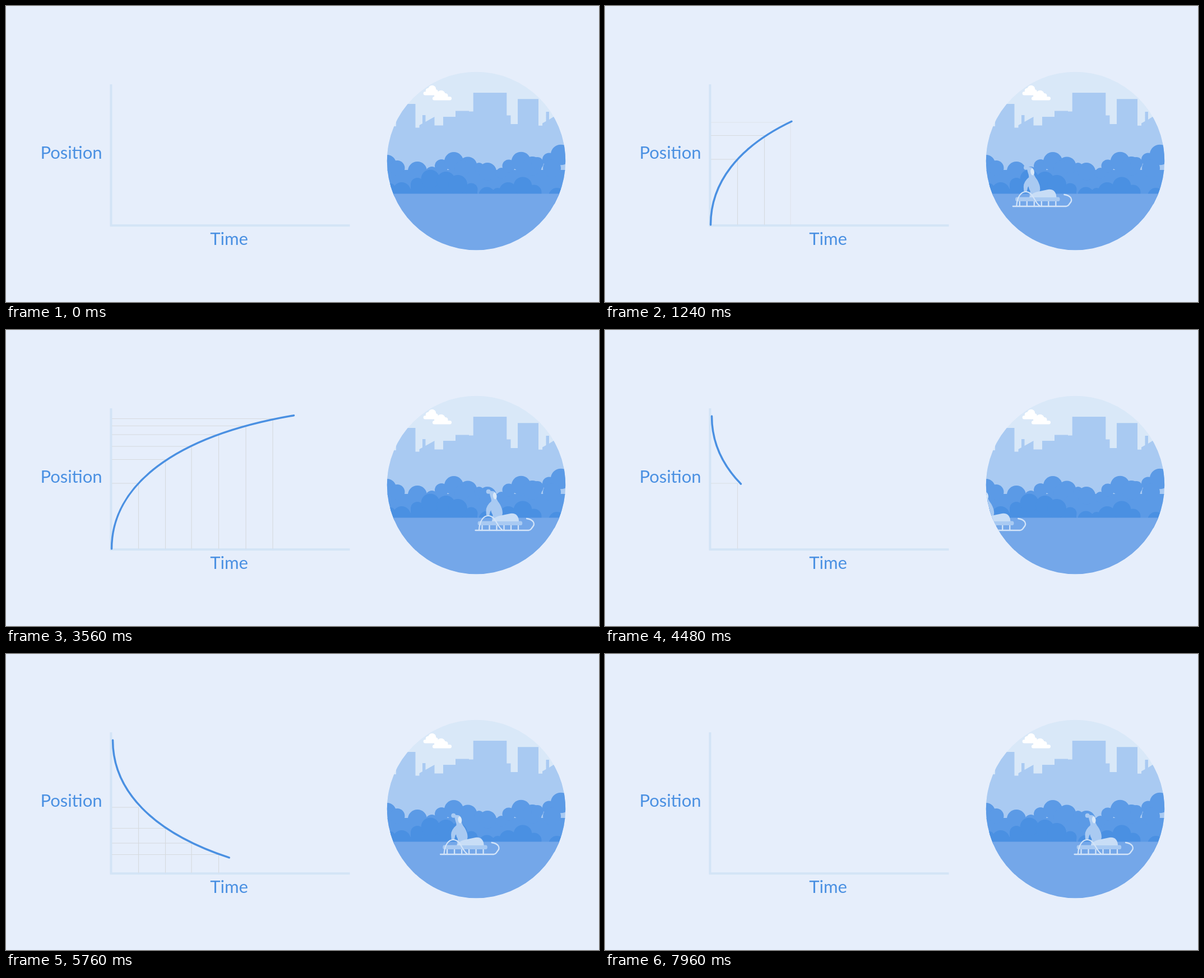
Write an HTML page that moves like this. It is 1058 px wide and 529 px high and loops after 8 s.

```html
<!DOCTYPE html>
<html lang="en">
<head>
<meta charset="utf-8">
<title>Position over time</title>
<style>
  html, body { margin: 0; width: 100%; height: 100%; overflow: hidden; background: #e6eefb; }
  svg { display: block; width: 100%; height: 100%; }
  text { font: 31px Lato, "Open Sans", sans-serif; fill: #4a90e2; text-anchor: middle; }
  .line { fill: none; stroke-linecap: round; stroke-linejoin: round; }
</style>
</head>
<body>
<svg viewBox="0 0 1058 529">
  <defs>
    <clipPath id="porthole"><circle cx="839" cy="277" r="159.2"/></clipPath>
  </defs>

  <text x="116.5" y="273">Position</text>
  <text x="398" y="427">Time</text>
  <path d="M187.4 140V392.3H613.5" fill="none" stroke="#d3e4f6" stroke-width="4"/>

  <g id="plot">
    <g id="grid" class="line" stroke="#d6dade" stroke-width="1.1"></g>
    <path id="curve" class="line" stroke="#4a90e2" stroke-width="3.5"/>
  </g>

  <g clip-path="url(#porthole)">
    <rect x="679" y="117" width="320" height="320" fill="#d9e8f8"/>
    <path fill="#a9caf2" d="M670 215H696V175H730.5V217.5H737.5V213L743 210V195H748.5V207L764.5 198V213.5H780V198H802V187.5H826V188.5H833.7V155H893.3V195.5H900.5V211H913V166.3H950V213.7H957V209.5L963.5 206V189H969V203L980 196H1000V340H670Z"/>
    <g fill="#fff">
      <rect x="744.7" y="153" width="27" height="6.6" rx="3.3"/>
      <circle cx="760.3" cy="148.8" r="7"/>
      <circle cx="753.5" cy="151.5" r="4.8"/>
      <circle cx="767" cy="153" r="3.8"/>
      <rect x="761" y="162" width="34" height="6.6" rx="3.3"/>
      <circle cx="776.3" cy="158.3" r="7.6"/>
      <circle cx="769" cy="160.5" r="5"/>
      <circle cx="784" cy="160.5" r="4.6"/>
    </g>
    <g id="back" fill="#5b9ae6"><rect x="679" y="293" width="320" height="44"/></g>
    <g id="front" fill="#4a90e2">
      <rect x="679" y="327" width="44" height="9"/>
      <path d="M722 336V319H745L760 308H800L815 320L841 331V336Z"/>
      <path d="M876 336L890 328H945V336Z"/>
    </g>
    <rect x="679" y="335.5" width="320" height="103" fill="#74a7e9"/>

    <g id="sled">
      <g class="line" stroke="#d3e4f8" stroke-width="2.3">
        <path d="M821.5 348V358M834.5 348V358M847.5 348V358M860.5 348V358M873 348V358M886 348V358"/>
        <path d="M809.5 358H904.5Q907 358 909 355.5L913 350Q915 346.5 912.5 342.5Q909 338 901 337"/>
      </g>
      <rect x="813.7" y="341.5" width="79.5" height="7.6" rx="3.4" fill="#a9caf2"/>
      <g fill="#a9caf2">
        <circle cx="832.7" cy="288.7" r="4"/>
        <path d="M834 289Q836 287 843 288.500Q847 291 846.500 300Q849 306 853 311Q858 320 858 327Q858 332 855 336L848 342H839Q839 337 840.500 331Q835 323 838 306Q838 302 836 297Z"/>
        <path d="M838 306Q828.500 314 828.500 323L829 331L834 333L836 324L842 317Z"/>
      </g>
      <ellipse cx="844.2" cy="296.500" rx="3.300" ry="6.200" transform="rotate(-8 844 296)" fill="#d9e8f8"/>
      <path d="M838.500 342Q842 335 851 332.500Q862 330 872 328Q880 327 884 332Q887 336 887 342Z" fill="#c8ddf6"/>
      <path class="line" d="M816 357C817 341 824 332 832 332C846 332 847 350 857 357" stroke="#d3e4f8" stroke-width="2.200"/>
    </g>
  </g>
</svg>
<script>
  const NS = "http://www.w3.org/2000/svg";
  const $ = id => document.getElementById(id);
  const clamp = v => Math.max(0, Math.min(1, v));

  function add(parent, tag, attrs) {
    const el = document.createElementNS(NS, tag);
    for (const k in attrs) el.setAttribute(k, attrs[k]);
    return parent.appendChild(el);
  }
  const bushes = (id, list) =>
    list.forEach(([cx, cy, r]) => add($(id), "circle", { cx, cy, r }));

  bushes("back", [
    [680, 282, 16], [698, 289.5, 13.5], [734, 295, 17], [760, 299, 12],
    [777, 286, 12], [799, 278, 17], [824, 286, 16.5], [844, 289, 9],
    [859, 296, 16], [884, 299, 10], [897, 286, 11.5], [919, 278, 17.3],
    [939, 286, 17], [948, 281, 11], [969, 274.500, 12], [990, 266, 18.3],
    [814, 290, 14], [974, 290, 16]
  ]);
  bushes("front", [
    [686, 325, 8], [706, 331, 16], [734, 319, 12], [757, 309, 16.5],
    [785, 312.5, 16.5], [806, 319, 17], [830, 328, 11.5], [858, 338, 14.5],
    [877, 335, 10], [896, 331, 16], [922, 322, 16.5], [942, 333, 13.5],
    [983, 340, 15]
  ]);

  // Two runs: a rising plot, then a falling one.
  const RUN = 4000;
  const gridX = [236.5, 284.5, 331, 379.5, 428, 476];
  const runs = [
    { x: 188.5, y: 391, dir: -1, gridY: [274, 231.5, 208, 187, 171.3, 158.5] },
    { x: 190.5, y: 154, dir: 1, gridY: [274, 311.5, 338, 358.5, 374, 386.5] }
  ];
  const shape = [[0, 0], [0, 112], [110, 201.8], [326, 238.5]];
  const lines = gridX.map(() => add($("grid"), "path", {}));

  function solve(f, target) {
    let lo = 0, hi = 1;
    for (let i = 0; i < 30; i++) {
      const mid = (lo + hi) / 2;
      if (f(mid) < target) lo = mid; else hi = mid;
    }
    return (lo + hi) / 2;
  }
  const bezier = (a, b, c, d) => s =>
    a * (1 - s) ** 3 + 3 * b * s * (1 - s) ** 2 + 3 * c * s * s * (1 - s) + d * s ** 3;

  const easeTime = bezier(0, 0, 0.63, 1);
  const easeValue = bezier(0, 0, 1, 1);
  const easeOut = p => p >= 1 ? 1 : easeValue(solve(easeTime, p));

  // Control points of the curve's first part, up to parameter s.
  function firstPart(points, s) {
    const out = [points[0]];
    while (points.length > 1) {
      points = points.slice(1).map((p, i) =>
        p.map((v, k) => points[i][k] + (v - points[i][k]) * s));
      out.push(points[0]);
    }
    return out;
  }

  const curveX = bezier(...shape.map(p => p[0]));

  function drawCurve(run, t) {
    const reach = Math.min(325, 0.1217 * (Math.sqrt((t - 40) ** 2 + 225) - 15));
    if (t < 40) return $("curve").setAttribute("d", "");
    const pts = firstPart(shape, solve(curveX, reach))
      .map(([x, y]) => (run.x + x).toFixed(2) + " " + (run.y + run.dir * y).toFixed(2));
    $("curve").setAttribute("d", `M${pts[0]}C${pts.slice(1).join(" ")}`);
  }

  function render(time) {
    const now = time % (2 * RUN);
    const run = runs[Math.floor(now / RUN)];
    const t = now % RUN;

    drawCurve(run, t);
    lines.forEach((line, i) => {
      line.setAttribute("d", `M189.5 ${run.gridY[i]}H${gridX[i]}V390.5`);
      line.setAttribute("opacity", clamp((t - 400 * (i + 1) + 20) / 120));
    });
    $("plot").setAttribute("opacity", clamp(1 - (t - 3720) / 240));

    const tip = 691 + 251 * easeOut(t / 3000);
    $("sled").setAttribute("transform", `translate(${(tip - 914).toFixed(2)} 0)`);
  }

  function tick() {
    render(performance.now());
    requestAnimationFrame(tick);
  }
  tick();
</script>
</body>
</html>
```
